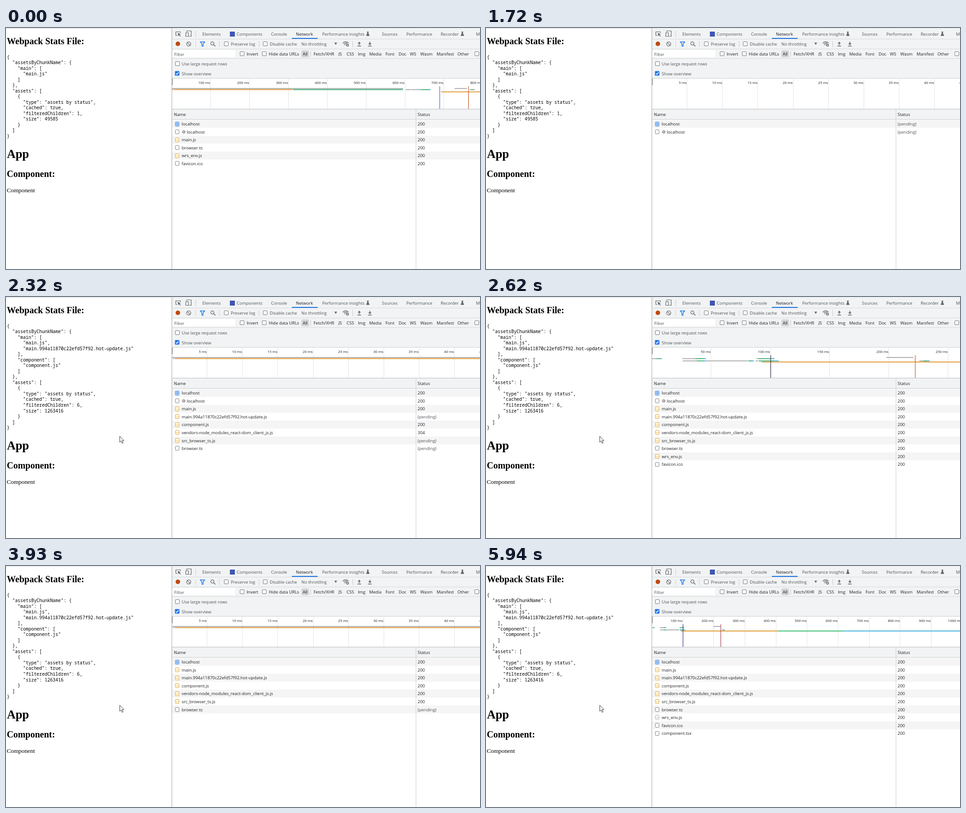
Animation of 1048 by 534 pixels, one loop 8 s. Source, as an HTML page:

```html
<!DOCTYPE html>
<html lang="en">
<head>
<meta charset="utf-8">
<title>Network panel</title>
<style>
html, body { margin: 0; width: 100%; height: 100%; overflow: hidden; background: #fff; }
svg { display: block; width: 1048px; height: 534px; }
text { white-space: pre; }
.ui { font: 9.5px "Open Sans", sans-serif; letter-spacing: -.03px; fill: #1f2124; }
.dim { fill: #505459; }
.tick { font-size: 7.9px; text-anchor: end; }
.serif { font: 13.33px "Liberation Serif", serif; }
.h1 { font-size: 26.67px; font-weight: bold; }
.h2 { font-size: 20px; font-weight: bold; }
.mono { font: 9.95px "Noto Sans Mono", monospace; }
</style>
</head>
<body>
<svg viewBox="0 0 1048 534">
  <g id="page"></g>
  <g id="panel"></g>
  <g id="overview"></g>
  <g id="rows"></g>
  <path id="cursor" d="M.5 .5V13.8L3.5 11L5.7 16.3L7.9 15.3L5.7 10.2H9.7Z" fill="#fff" stroke="#222" stroke-width=".9"/>
</svg>
<script>
const $ = id => document.getElementById(id);
const rect = (x, y, w, h, fill, extra = '') => `<rect x="${x}" y="${y}" width="${w}" height="${h}" fill="${fill}" ${extra}/>`;
const text = (x, y, s, cls = 'ui') => `<text x="${x}" y="${y}" class="${cls}">${s}</text>`;
const path = (d, stroke = '#5f6368', fill = 'none', w = 1.2) => `<path d="${d}" stroke="${stroke}" fill="${fill}" stroke-width="${w}"/>`;
const box = (x, y) => rect(x + .5, y + .5, 9, 9, '#fff', 'stroke="#767676" rx="1.5"');
const GRAY = '#a0a0a0', ORANGE = '#dc8c14', GREEN = '#1fa463', BLUE = '#2aa5d8', RED = '#c0490f', NAVY = '#2c5cb0';
const EDGE = '#cacdd1', BAR = '#f1f3f4';

// Left page
const HASHED = 'main.994a11870c22efd57f92.hot-update.js';
function stats(split) {
  const chunks = split ? { main: ['main.js', HASHED], component: ['component.js'] } : { main: ['main.js'] };
  const asset = { type: 'assets by status', cached: true, filteredChildren: split ? 6 : 1, size: split ? 1263416 : 49585 };
  return JSON.stringify({ assetsByChunkName: chunks, assets: [asset] }, null, 2).split('\n');
}
function drawPage(split) {
  const dy = split ? 50 : 0;
  return rect(0, 0, 367, 1.4, '#dfe0e2') + text(1.7, 36, 'Webpack Stats File:', 'serif h2') +
    stats(split).map((s, i) => text(2, 67.7 + i * 12.52, s, 'mono')).join('') +
    text(2, 288 + dy, 'App', 'serif h1') + text(1.7, 330 + dy, 'Component:', 'serif h2') +
    text(1.7, 363.5 + dy, 'Component', 'serif');
}

// Fixed parts of the tool panel
function flask(x) {
  return path(`M${x - 2} 8.5H${x + 2}M${x - 1} 8.5V12L${x - 3.5} 17H${x + 3.5}L${x + 1} 12V8.5Z`, '#5f6368', '#5f6368', .8);
}
function arrow(x, up) {
  const tip = up ? 30.5 : 38, base = up ? 34.5 : 34;
  return path(`M${x} ${up ? 38 : 30.5}V${base}M${x - 4} 40H${x + 4}`, '#5f6368', 'none', 1.6) +
    path(`M${x - 3.6} ${base}H${x + 3.6}L${x} ${tip}Z`, 'none', '#5f6368');
}
function drawPanel() {
  const tabs = [[434, 'Elements'], [510, 'Components'], [586, 'Console'], [699, 'Performance insights'],
    [831, 'Sources'], [885, 'Performance'], [961, 'Recorder'], [1039, 'Memory']];
  const kinds = [[680, 'Fetch/XHR'], [735, 'JS'], [753, 'CSS'], [778, 'Img'], [803, 'Media'], [839, 'Font'],
    [868, 'Doc'], [893, 'WS'], [916, 'Wasm'], [952, 'Manifest'], [998, 'Other']];
  const rules = [24, 46, 67].map(y => rect(367, y, 681, 1, '#d6d9dc')).join('');
  const seps = [[419, 6, 14], [419, 29, 13], [471, 29, 13], [559, 29, 13], [766, 29, 13], [673, 51, 13]]
    .map(([x, y, h]) => rect(x, y, 1, h, EDGE)).join('');
  return rect(367, 1, 681, 111, BAR) + rect(367, 0, 681, 1, '#e4e6e8') + rules + seps +
    tabs.map(([x, s]) => text(x, 16.5, s, 'ui dim')).join('') + text(641, 16.5, 'Network') +
    rect(632, 22, 57, 2, '#1a73e8') + rect(495, 8, 11, 11, '#3f55b0') + flask(800) + flask(1009) +
    path('M379 16.5H375.5V8.5H385.5V11') + path('M379.5 11L386.5 13.7L383.5 14.7L386.5 18L385.5 19L382.4 15.8L381.4 18.4Z', 'none', '#5f6368') +
    path('M399.5 9V6.5H409.5V18.5H405M397.5 10.5H403.5V18.5H397.5Z') +
    `<circle cx="380" cy="35" r="5" fill="${RED}"/><circle cx="404" cy="35.3" r="4.6" fill="none" stroke="#5f6368" stroke-width="1.3"/>` +
    path('M400.8 32.1L407.2 38.5') + path('M429.7 30.7H439.3L435.7 35.5V40.5H433.3V35.5Z', '#1a73e8', 'none', 1.4) +
    '<circle cx="456.3" cy="34.2" r="3.5" fill="none" stroke="#5f6368" stroke-width="1.3"/>' + path('M458.9 36.8L463 40.8', '#5f6368', 'none', 1.6) +
    box(482, 30) + text(497, 39, 'Preserve log', 'ui dim') + box(568, 30) + text(583, 39, 'Disable cache', 'ui dim') +
    text(653, 39, 'No throttling', 'ui dim') + path('M726 32.5H732L729 37.5Z', 'none', '#5f6368') +
    path('M744.5 33.5Q751 27.5 757.5 33.5M746.8 35.8Q751 32 754.5 34.4M749 38L751 36.2', '#5f6368', 'none', 1.3) +
    '<circle cx="755" cy="38" r="2.3" fill="none" stroke="#5f6368" stroke-width="1.5"/>' + arrow(781, true) + arrow(804.5, false) +
    rect(367, 49, 140, 16, '#fff') + text(372, 61.5, 'Filter', 'ui dim') +
    box(517, 52) + text(532, 61, 'Invert') + box(566, 52) + text(581, 61, 'Hide data URLs') +
    rect(653, 49.5, 17, 15.5, '#d3d6d9', 'rx="3"') + text(656, 61, 'All') +
    kinds.map(([x, s]) => text(x, 61, s)).join('') + box(1036, 52) +
    box(374, 74) + text(388.5, 83, 'Use large request rows', 'ui dim') +
    rect(373.5, 95.5, 10, 10, '#1a73e8', 'rx="1.5"') + path('M375.5 100.5L377.7 102.8L381.7 98', '#fff', 'none', 1.5) +
    text(388.5, 104.5, 'Show overview', 'ui dim');
}

// Timeline: bars are [lane, x, width, colour], x measured from the left edge
const bars = (list, k = 1) => list.map(([lane, x, w, c]) => rect(367 + x * k, 133.2 + lane * 2.5, w * k, 1.7, c)).join('');
const mark = (x, c) => rect(x, 129, 1.1, 50, c);
const slow = [[0, 0, 511, GRAY], [1, 0, 3, GRAY], [1, 4, 262, ORANGE], [1, 267, 242, GREEN], [1, 509, 2, BLUE],
  [1, 517, 11, GRAY], [1, 529, 22, GRAY], [1, 551, 17, GREEN], [1, 568, 4, BLUE],
  [3, 595, 90, ORANGE], [0, 625, 27, GRAY], [1, 658, 3, GRAY], [1, 661, 4, GREEN], [1, 665, 4, BLUE]];
const fast = [[1, 0, 10, GRAY], [1, 10, 9, GREEN], [1, 19, 3, BLUE],
  [1, 67, 29, GRAY], [1, 96, 18, GREEN], [1, 114, 5, BLUE],
  [3, 68, 31, GRAY], [3, 99, 16, GREEN], [3, 115, 4, BLUE],
  [3, 119, 93, GRAY], [3, 213, 8, GREEN], [3, 221, 4, BLUE],
  [1, 231, 5, GRAY], [1, 236, 26, GREEN], [1, 262, 9, BLUE],
  [3, 229, 6, GRAY], [3, 236, 34, GREEN], [3, 270, 10, BLUE],
  [4, 242, 4, GRAY], [4, 246, 817, ORANGE], [4, 1063, 555, '#1fb45c'], [4, 1618, 990, BLUE],
  [0, 518, 60, GRAY], [3, 591, 9, GRAY], [3, 600, 10, GREEN], [3, 610, 4, BLUE]];
const early = [[0, 0, 681, GRAY], [1, 2, 3, GRAY], [1, 6, 4, GRAY], [1, 10, 671, ORANGE]];
const scales = {
  first: [85.9, 100, () => bars(slow) + mark(958.4, NAVY) + mark(1022, RED)],
  empty: [78.1, 5, () => ''],
  start: [78.1, 5, () => bars(early)],
  done: [131, 50, () => bars(fast) + mark(629, '#26264a') + mark(948.5, RED)],
  wide: [68.65, 100, () => bars(fast, .262) + mark(435, '#2b2478') + mark(518.6, '#9c2a3c')]
};
function drawOverview(name) {
  const [step, ms, content] = scales[name];
  let s = rect(367, 112, 681, 68, '#fff') + rect(367, 111, 681, 1, EDGE);
  for (let i = 1; i * step < 720; i++) {
    const x = 367 + i * step;
    s += rect(Math.floor(x - .4), 112, 1, 67, '#e3e3e3') + text(x - 1.3, 124, i * ms + ' ms', 'ui tick');
  }
  return s + rect(367, 112, 1.3, 14.5, '#6b6f73') + content();
}

// Request table
const icons = {
  doc: y => rect(374.5, y - 4.5, 8, 9, '#e8f0fe', 'stroke="#1a73e8" rx=".8"') + path(`M376 ${y - 2}H381M376 ${y}H381M376 ${y + 2}H381`, '#1a73e8', 'none', 1),
  js: (y, c = '#e8a010') => rect(374.5, y - 4.5, 8, 9, '#fff', `stroke="${c}" rx=".8"`) + path(`M377.6 ${y - .8}L376.4 ${y + .7}L377.6 ${y + 2.2}M379.4 ${y - .8}L380.6 ${y + .7}L379.4 ${y + 2.2}`, c, 'none', 1),
  env: y => icons.js(y, '#aaa'),
  file: y => rect(374.5, y - 4.5, 8, 9, '#fff', 'stroke="#7b7f83" rx=".8"'),
  worker: y => icons.file(y) + `<circle cx="393" cy="${y + .2}" r="2.5" fill="none" stroke="#62665a" stroke-width="1.1"/>` +
    `<circle cx="393" cy="${y + .2}" r="3.3" fill="none" stroke="#62665a" stroke-width=".8" stroke-dasharray="1.1 1.5"/><circle cx="393" cy="${y + .2}" r=".7" fill="#62665a"/>`
};
const doc = ['doc', 'localhost'], worker = ['worker', 'localhost'], main = ['js', 'main.js'], live = ['file', 'browser.ts'],
  env = ['env', 'wrs_env.js'], favicon = ['file', 'favicon.ico'];
const modules = [main, ['js', HASHED], ['js', 'component.js'], ['js', 'vendors-node_modules_react-dom_client_js.js'], ['js', 'src_browser_ts.js'], live];
const initial = [doc, worker, main, live, ['js', 'wrs_env.js'], favicon];
const reload1 = [doc, worker, ...modules, ['js', 'wrs_env.js'], favicon];
const reload2 = [doc, ...modules, env, favicon, ['file', 'component.tsx']];

function drawRows(list, pending, cached) {
  let s = rect(367, 179, 681, 1.6, '#c3c6ca') + rect(367, 180.6, 681, 21.4, BAR) + rect(367, 202, 681, 1, EDGE) +
    text(371, 195, 'Name') + text(910, 195, 'Status');
  list.forEach(([kind, name], i) => {
    const y = 212.6 + i * 17.55, base = Math.round(y + 3.6), wait = pending.includes(i);
    if (i % 2 === 0) s += rect(367, y - 8.9, 681, 17.55, '#f5f5f5');
    s += icons[wait && kind === 'js' && i > 7 ? 'file' : kind](Math.round(y)) +
      text(kind === 'worker' ? 399.7 : 388.5, base, name) +
      text(910, base, wait ? '(pending)' : i === cached ? '304' : '200', wait ? 'ui dim' : 'ui');
  });
  return s + rect(906, 181, 1, 353, EDGE) + rect(366, 1, 1.3, 533, '#b4b8bc');
}

// [start, page split, scale, list, visible rows, pending rows, cached row]
const states = [
  [0, false, 'first', initial, 6, []],
  [1720, false, 'empty', reload1, 2, [0, 1]],
  [2220, true, 'empty', reload1, 3, [2]],
  [2320, true, 'start', reload1, 8, [3, 6, 7], 5],
  [2420, true, 'done', reload1, 8, [7]],
  [2520, true, 'done', reload1, 10, [8, 9]],
  [2620, true, 'done', reload1, 10, []],
  [3730, true, 'empty', reload2, 1, [0]],
  [3830, true, 'start', reload2, 6, [2, 5]],
  [3930, true, 'start', reload2, 7, [6]],
  [4030, true, 'done', reload2, 9, [6]],
  [4430, true, 'done', reload2, 9, []],
  [5940, true, 'wide', reload2, 10, []]
];

const mix = (a, b, u) => a + (b - a) * u;
const glide = (x0, y0, x1, y1, u) => [mix(x0, x1, u), mix(y0, y1, u)];
function cursorAt(t) {
  if (t < 100 || t >= 1010 && t < 1820) return null;
  if (t < 910) {
    const u = Math.min(7, Math.floor((t - 100) / 101.4)) / 7;
    return glide(958, 516, 146, 61, mix(u, u * (2 - u), .5));
  }
  if (t < 1010) return [68, 0];
  const u = Math.min(4, Math.floor((t - 1820) / 100)) / 4;
  return glide(88, 29, 251, 308, u * (2 - u));
}

let shown = null;
function update(t) {
  const state = states.filter(s => s[0] <= t).pop();
  if (state !== shown) {
    const [, split, scale, list, count, pending, cached] = state;
    $('page').innerHTML = drawPage(split);
    $('overview').innerHTML = drawOverview(scale);
    $('rows').innerHTML = drawRows(list.slice(0, count), pending, cached);
    shown = state;
  }
  const p = cursorAt(t);
  $('cursor').style.display = p ? '' : 'none';
  if (p) $('cursor').setAttribute('transform', `translate(${p[0].toFixed(1)} ${p[1].toFixed(1)})`);
}

$('panel').innerHTML = drawPanel();
const begin = performance.now();
function tick() {
  update((performance.now() - begin) % 8000);
  requestAnimationFrame(tick);
}
tick();
</script>
</body>
</html>
```
